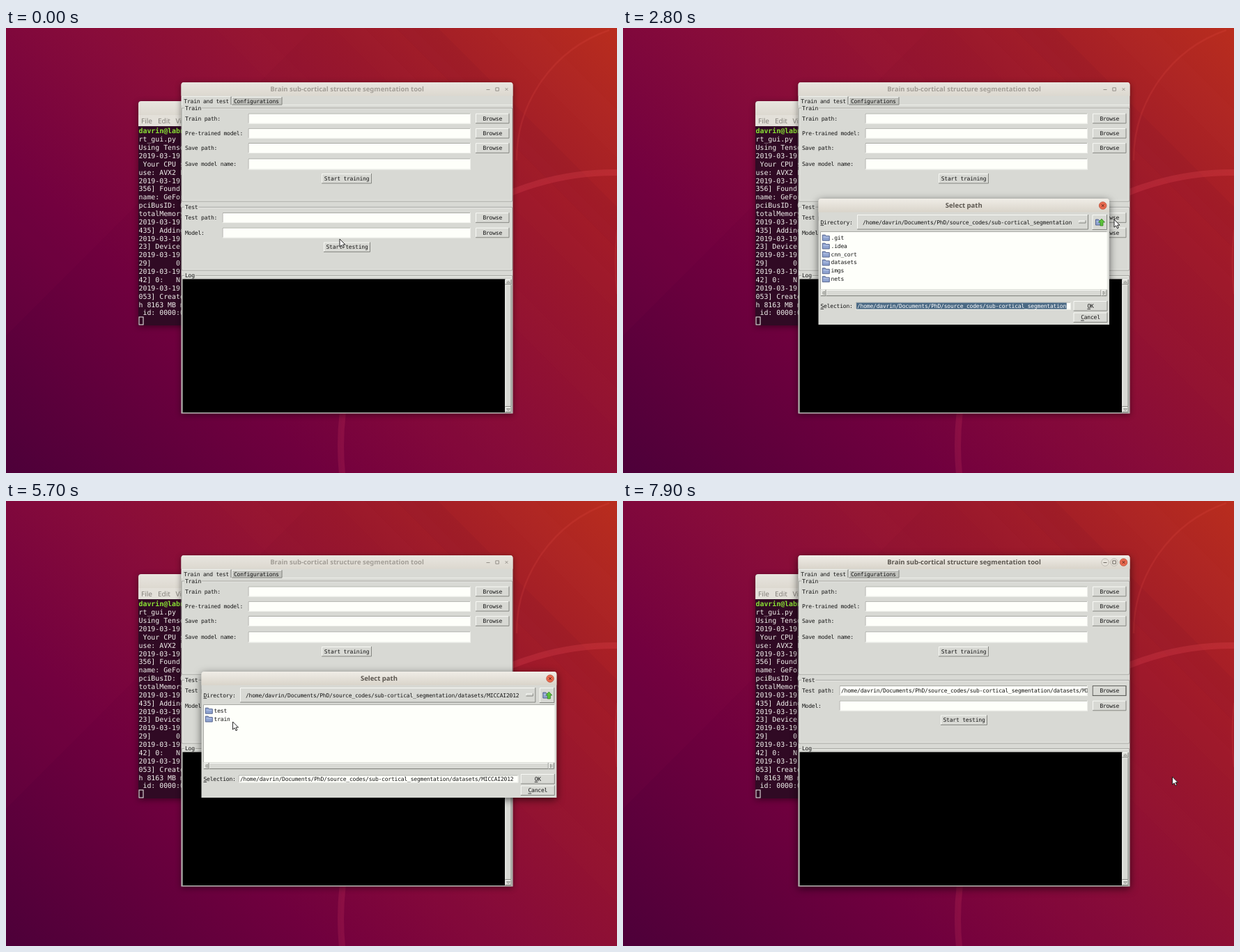
Animation, 877 px wide and 639 px high, one loop 8 s. Source, as an HTML page:

```html
<!DOCTYPE html>
<html lang="en">
<head>
<meta charset="utf-8">
<title>Segmentation tool demo</title>
<style>
html, body { margin: 0; width: 100%; height: 100%; overflow: hidden; background: #7a0a3c; }
svg { display: block; width: 877px; height: 639px; }
text { white-space: pre; text-rendering: geometricPrecision; }
.ui { font: 8px "DejaVu Sans Mono", monospace; letter-spacing: -.2px; }
.term { font: 9.9px "DejaVu Sans Mono", monospace; }
.prompt { font: bold 9.9px "DejaVu Sans Mono", monospace; }
.menu { font: 10px "Noto Sans", sans-serif; }
.title { font: bold 9.5px "Noto Sans", sans-serif; text-anchor: middle; }
.shadow { filter: drop-shadow(0 2px 4px rgba(0,0,0,.45)); }
.focused .shadow { filter: drop-shadow(0 3px 6px rgba(0,0,0,.6)); }
</style>
</head>
<body>
<svg viewBox="0 0 877 639" xmlns="http://www.w3.org/2000/svg">
  <defs>
    <linearGradient id="wall" gradientUnits="userSpaceOnUse" x1="60" y1="700" x2="817" y2="-60">
      <stop offset="0" stop-color="#4d0039"/>
      <stop offset=".3" stop-color="#70003e"/>
      <stop offset=".5" stop-color="#850b39"/>
      <stop offset=".74" stop-color="#9a182b"/>
      <stop offset="1" stop-color="#b92d1e"/>
    </linearGradient>
    <linearGradient id="ring" gradientUnits="userSpaceOnUse" x1="480" y1="639" x2="877" y2="207">
      <stop stop-color="#d03a60" stop-opacity=".2"/><stop offset="1" stop-color="#e2434c" stop-opacity=".3"/>
    </linearGradient>
    <linearGradient id="barOff" x2="0" y2="1">
      <stop stop-color="#e8e5df"/><stop offset="1" stop-color="#dcd8cf"/>
    </linearGradient>
    <linearGradient id="barOn" x2="0" y2="1">
      <stop stop-color="#f0ede7"/><stop offset="1" stop-color="#d9d4ca"/>
    </linearGradient>
    <clipPath id="termClip"><rect x="190" y="105" width="62" height="322"/></clipPath>
    <clipPath id="entryClip"><rect x="312" y="266" width="354.5" height="14"/></clipPath>
  </defs>
  <g id="desktop"></g>
  <g id="terminal"></g>
  <g id="main"></g>
  <g id="dialog" class="focused"></g>
  <path id="pointer" d="M0 0V11.2L2.6 8.8L4.5 12.8L6.3 12L4.5 8.1H8Z"
        fill="#fff" stroke="#111" stroke-width=".9" stroke-linejoin="round"/>
</svg>
<script>
const el = id => document.getElementById(id);
const FACE = '#d8d9d4', PAPER = '#fefffa', INK = '#141414', MARK = '#4a6984';
const CHAR = 4.616;

const rect = (x, y, w, h, fill, extra = '') =>
  `<rect x="${x}" y="${y}" width="${w}" height="${h}" fill="${fill}" ${extra}/>`;
const line = (d, color, width = 1, extra = '') =>
  `<path d="${d}" fill="none" stroke="${color}" stroke-width="${width}" ${extra}/>`;
const text = (x, y, s, cls = 'ui', fill = INK) =>
  `<text x="${x}" y="${y}" class="${cls}" fill="${fill}">${s}</text>`;
// Interface label, placed by its vertical middle.
const label = (x, mid, s, fill = INK) => text(x, mid + 2.7, s, 'ui', fill);
const hotkey = (x, mid, s) =>
  label(x, mid, s) + rect(x, mid + 3.9, CHAR, .8, INK);

function bevel(x, y, w, h, fill = FACE, raised = true) {
  const [a, b] = raised ? ['#f8f9f5', '#858681'] : ['#a9aaa5', '#eeefea'];
  return rect(x, y, w, h, fill) +
    line(`M${x + .5} ${y + h}V${y + .5}H${x + w}`, a) +
    line(`M${x} ${y + h - .5}H${x + w - .5}V${y}`, b);
}
const entry = (x, y, w, h) => bevel(x, y, w, h, PAPER, false);

function button(x, y, w, h, s, { key = false, fill = FACE } = {}) {
  const tx = x + (w - s.length * CHAR) / 2;
  return bevel(x, y, w, h, fill) + (key ? hotkey : label)(tx, y + h / 2, s);
}

function group(y, h, s) {
  const box = d => `M${252.5 + d} ${y + d}H${726.5 - d}V${y + h - d}H${252.5 + d}Z`;
  return line(box(.9), '#f4f5f0', .8) + line(box(0), '#9a9b96', .8) +
    rect(256, y - 4, s.length * CHAR + 2, 8, FACE) + label(257, y, s);
}

function frame(x, y, w, h, title, on) {
  const cx = x + w / 2;
  return `<path class="shadow" fill="${FACE}" d="M${x} ${y + h}V${y + 4}q0-4 4-4H${x + w - 4}q4 0 4 4V${y + h}Z"/>` +
    `<path fill="url(#${on ? 'barOn' : 'barOff'})" d="M${x} ${y + 19.5}V${y + 4}q0-4 4-4H${x + w - 4}q4 0 4 4V${y + 19.5}Z"/>` +
    text(cx, y + 13.2, title, 'title', on ? '#5b564f' : '#a39e97');
}

function closeButton(x, y, on) {
  return (on ? `<circle cx="${x}" cy="${y}" r="5.3" fill="#e9694d" stroke="#b9543f" stroke-width=".8"/>` : '') +
    line(`M${x - 1.8} ${y - 1.8}l3.6 3.6m0-3.6l-3.6 3.6`, on ? '#5c2a20' : '#96918a', 1);
}

function drawDesktop() {
  let s = rect(0, 0, 877, 639, 'url(#wall)');
  const stripes = [[300, 60], [470, 45], [560, 24], [690, 70]];
  for (const [x, w] of stripes)
    s += `<path d="M${x} 0h${w}l640 640h${-w}Z" fill="#ff7a60" opacity=".012"/>`;
  s += '<path d="M560 0h60l300 300v60Z" fill="#5c0025" opacity=".06"/>';
  s += '<path d="M0 442L442 0H0Z" fill="#ff2a60" opacity=".025"/>';
  s += '<circle cx="873" cy="600" r="393" fill="#e0203c" opacity=".02"/>';
  s += '<circle cx="873" cy="600" r="392.5" fill="none" stroke="url(#ring)" stroke-width="9"/>';
  s += line('M733 190A197 197 0 0 1 866 3', '#e8554a', 2.5, 'opacity=".16"');
  s += line('M877 290Q872 335 877 382', '#e8554a', 2, 'opacity=".16"');
  el('desktop').innerHTML = s;
}

function drawTerminal() {
  const stamp = '2019-03-19 ';
  const rows = ['rt_gui.py', 'Using TensorFlow', stamp, ' Your CPU s', 'use: AVX2 F', stamp,
    '356] Found ', 'name: GeForce', 'pciBusID: 0000', 'totalMemory:', stamp, '435] Adding', stamp,
    '23] Device ', stamp, '29]      0 ', stamp, '42] 0:   N ', stamp, '053] Created',
    'h 8163 MB m', ' id: 0000:0'];
  const baseline = i => 151.3 + i * 11.87;
  const base = '<path class="shadow" fill="#300a24" d="M190 427V109q0-4 4-4H300V427Z"/>';
  let s = '<path fill="url(#barOff)" d="M190 126V109q0-4 4-4H300V126Z"/>' +
    rect(190, 125, 62, 16, '#e3e0d9');
  ['File', 'Edit', 'View'].forEach((m, i) => s += text([194, 218, 243.5][i], 136.8, m, 'menu', '#85817b'));
  s += text(190.5, baseline(0), 'davrin@labnode', 'prompt', '#8ae234');
  rows.forEach((r, i) => s += text(190.5, baseline(i + 1), r, 'term', '#f2f2ee'));
  s += '<rect x="191" y="415" width="6" height="11" fill="none" stroke="#f2f2ee" stroke-width="1"/>';
  el('terminal').innerHTML = `${base}<g clip-path="url(#termClip)">${s}</g>`;
}

const HOME = '/home/davrin/Documents/PhD/source_codes/sub-cortical_segmentation';
const DATA = HOME + '/datasets', SET = DATA + '/MICCAI2012', TEST = SET + '/test';

function drawMain({ on, filled }) {
  let s = frame(251.5, 78, 476, 475.5, 'Brain sub-cortical structure segmentation tool', on);
  const glyph = on ? '#6f6a63' : '#96918a';
  if (on) for (const x of [692, 705])
    s += `<circle cx="${x}" cy="88" r="5.3" fill="#e6e2da" stroke="#b5b0a7" stroke-width=".8"/>`;
  s += line('M689.5 88.5h5', glyph) + line('M702.8 85.8h4.6v4.4h-4.6Z', glyph) + closeButton(718.5, 88, on);

  s += line('M252 110.5H727', '#f4f5f0', .8);
  s += bevel(324, 99, 72.5, 11.5, '#c2c3be') + label(327, 105, 'Configurations');
  s += rect(252, 98, 71, 13, FACE) + line('M252.5 111V98.4H323', '#f8f9f5', .8) + line('M323 98.5V110', '#6f706c');
  s += label(255.3, 105, 'Train and test');

  s += group(115, 134, 'Train');
  ['Train path:', 'Pre-trained model:', 'Save path:', 'Save model name:'].forEach((name, i) => {
    const mid = [130, 151.3, 172.5, 194.8][i];
    s += label(257, mid, name) + entry(347.5, mid - 7.5, 319.5, i < 3 ? 15 : 16);
    if (i < 3) s += button(674, mid - 7.3, 48.5, 14.6, 'Browse');
  });
  s += button(453, 209, 72, 14.5, 'Start training');

  s += group(257.3, 90.7, 'Test');
  ['Test path:', 'Model:'].forEach((name, i) => {
    const mid = [272.5, 294][i];
    s += label(257, mid, name) + entry(310.5, mid - 7.5, 356.5, 15) + button(674, mid - 7.3, 48.5, 14.6, 'Browse');
  });
  if (filled) {
    s += `<g clip-path="url(#entryClip)">${label(313, 272.5, TEST)}</g>`;
    s += '<rect x="674.3" y="265.5" width="47.7" height="14" fill="none" stroke="#5f605c" stroke-width="1"/>';
  }
  s += button(456, 307.5, 67, 14.5, 'Start testing');

  s += group(355.5, 197, 'Log');
  s += rect(253.5, 360.5, 463, 191.5, '#000');
  s += rect(716.5, 361, 9.5, 191, '#c6c7c2') + bevel(716.5, 368.5, 9, 175.5);
  s += bevel(716.5, 361, 9, 7.5) + bevel(716.5, 544, 9, 8);
  s += line('M718.7 366h4.6l-2.3-2.6Z', '#858681', .8) + line('M718.7 546.8h4.6l-2.3 2.6Z', '#858681', .8);
  el('main').innerHTML = s;
  el('main').setAttribute('class', on ? 'focused' : '');
}

const folder = (x, y) =>
  `<path d="M${x} ${y + 9}V${y + 1}h4l1 1.5h5V${y + 9}Z" fill="#8fa3d0" stroke="#4b5a86" stroke-width=".9"/>` +
  line(`M${x + 1} ${y + 4}h8.2`, '#c5d1ee', .9);

function drawDialog(state) {
  if (!state) { el('dialog').innerHTML = ''; return; }
  const { path, items, row = -1, marked, hot } = state;
  const right = 698 + (path.length - HOME.length) * CHAR;
  let s = frame(280.5, 245, right - 280.5, 181, 'Select path', true) + closeButton(right - 9.3, 255, true);

  s += hotkey(283.5, 279, 'Directory:');
  s += bevel(336, 268, right - 366, 21.5) + label(344, 279, path);
  s += bevel(right - 44, 276.3, 10.5, 4.2);
  s += bevel(right - 24.5, 268, 21.5, 22) + folder(right - 19.5, 274) +
    `<path d="M${right - 13} 284v-5h-2.5l4.5-5l4.5 5h-2.5v5Z" fill="#5cc23a" stroke="#2c7a1c" stroke-width=".7"/>`;

  s += entry(283, 292, right - 285.5, 84);
  items.forEach((name, i) => {
    const mid = 301 + i * 11.9;
    s += folder(286.3, mid - 4.8);
    if (i === row) s += rect(298, mid - 4.3, name.length * CHAR + 1.8, 8.6, MARK);
    s += label(298.6, mid, name, i === row ? '#fff' : INK);
  });
  s += rect(283, 375.5, right - 285.5, 10, '#c6c7c2') + bevel(291.5, 376, right - 303, 9);
  s += bevel(284, 376, 7.5, 9) + bevel(right - 11.5, 376, 8, 9);
  s += line('M289 378.2v4.6l-2.6-2.3Z', '#858681', .8) +
    line(`M${right - 8.8} 378.2v4.6l2.6-2.3Z`, '#858681', .8);

  s += hotkey(283.5, 399.3, 'Selection:') + entry(333.5, 393.5, right - 388.5, 11);
  if (marked) s += rect(335, 394.5, path.length * CHAR + 1.7, 9.2, MARK);
  s += label(336, 399.3, path, marked ? '#fff' : INK);
  s += button(right - 51.5, 392, 49, 14.5, 'OK', { key: true, fill: hot ? '#ecede8' : FACE });
  s += button(right - 51.5, 408.5, 49, 14.5, 'Cancel', { key: true });
  el('dialog').innerHTML = s;
}

const rootItems = ['.git', '.idea', 'cnn_cort', 'datasets', 'imgs', 'nets'];
const sets = ['IBSR18', 'MICCAI2012'], parts = ['test', 'train'];
const mainSteps = [
  [0, { on: false }], [300, { on: true }], [2300, { on: false }], [7800, { on: true, filled: true }]];
const dialogSteps = [
  [0, null],
  [2300, { path: HOME, items: rootItems, marked: true }],
  [4000, { path: HOME, items: rootItems }],
  [4200, { path: HOME, items: rootItems, row: 3 }],
  [4300, { path: DATA, items: sets }],
  [5100, { path: DATA, items: sets, row: 1 }],
  [5300, { path: SET, items: parts }],
  [6200, { path: SET, items: parts, row: 0 }],
  [6500, { path: TEST, items: parts, row: 0 }],
  [6900, { path: TEST, items: ['1003'] }],
  [7400, { path: TEST, items: ['1003'], hot: true }],
  [7800, null]];
const pointerPath = [
  [0, 479, 303], [200, 479, 303], [1000, 312, 266], [1200, 312, 266], [1500, 674, 273],
  [1700, 733, 274], [2000, 705, 275], [2800, 705, 275], [3600, 359, 340], [3700, 359, 340],
  [4000, 326, 335], [4400, 326, 335], [4900, 326, 317], [5700, 325.5, 317], [6200, 306, 301],
  [6400, 306, 301], [6500, 311, 303], [6900, 311, 303], [7200, 749, 379], [7300, 749, 379],
  [7500, 788.5, 396], [8000, 788.5, 396]];

const stepAt = (steps, t) => steps.findLast(([start]) => start <= t)[1];
function pointerAt(t) {
  const i = pointerPath.findIndex(p => p[0] > t);
  const [t0, x0, y0] = pointerPath[i - 1], [t1, x1, y1] = pointerPath[i];
  const k = (t - t0) / (t1 - t0);
  return [x0 + (x1 - x0) * k, y0 + (y1 - y0) * k];
}

let shownMain, shownDialog;
function show(time) {
  const t = Math.floor((time % 8000) / 100) * 100;
  const main = stepAt(mainSteps, t), dialog = stepAt(dialogSteps, t);
  if (main !== shownMain) drawMain(shownMain = main);
  if (dialog !== shownDialog) drawDialog(shownDialog = dialog);
  el('pointer').setAttribute('transform', `translate(${pointerAt(t)})`);
}

drawDesktop();
drawTerminal();
show(0);
const begin = performance.now();
(function tick() {
  show(performance.now() - begin);
  requestAnimationFrame(tick);
})();
</script>
</body>
</html>
```
